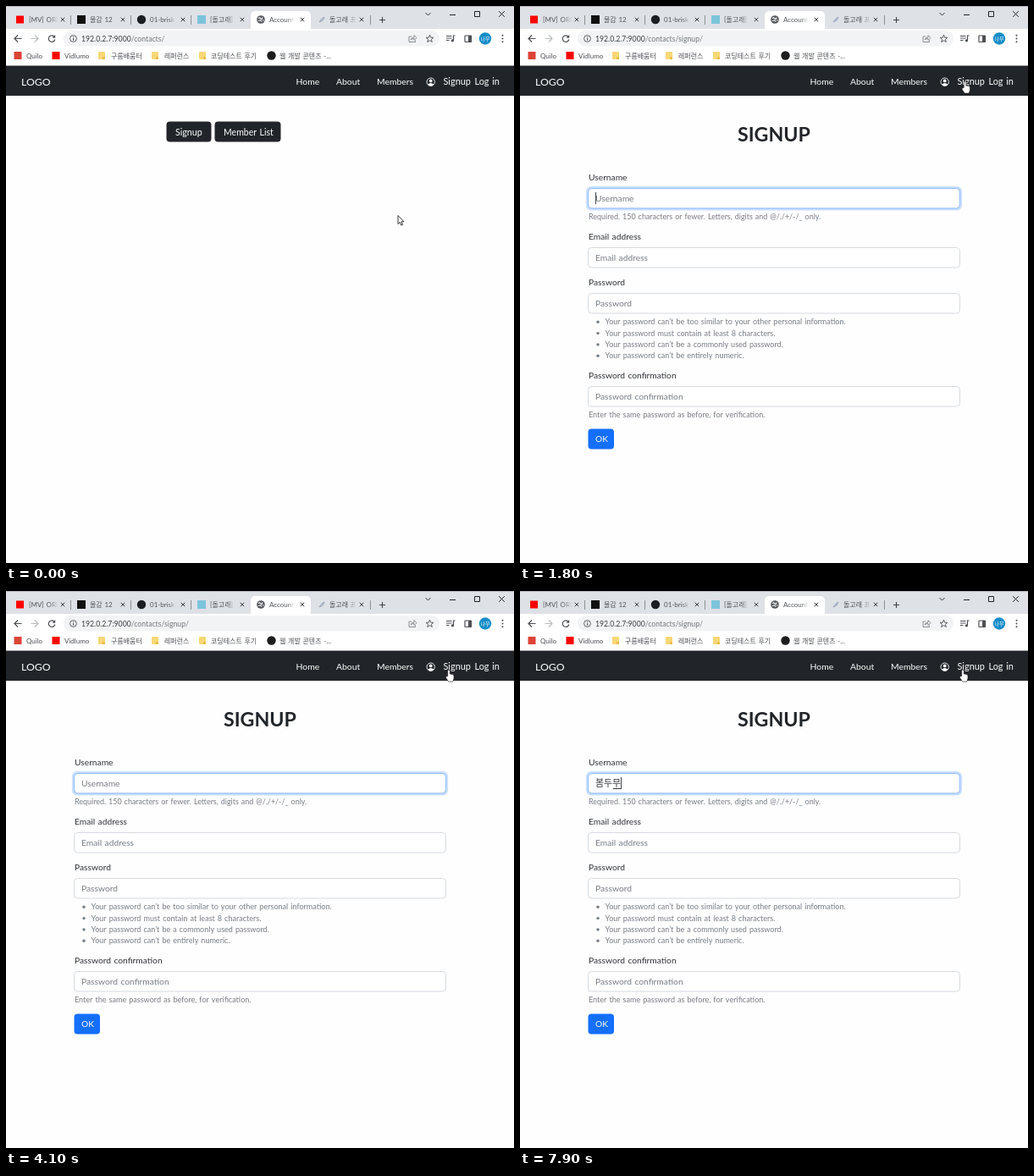
Write an HTML page with a canvas that moves like this. It is 600 by 658 pixels and loops after 8000 ms.

```html
<!DOCTYPE html>
<html lang="ko">
<head>
<meta charset="utf-8">
<style>
html, body { margin: 0; width: 100%; height: 100%; overflow: hidden; background: #fefefe; }
canvas { display: block; }
</style>
</head>
<body>
<canvas id="stage" width="600" height="658"></canvas>
<script>
const ctx = document.getElementById('stage').getContext('2d');
const LOOP = 8000, DARK = '#212529', INK = '#2f3337', GRAY = '#757d85', ICON = '#4b4f54', BLUE = '#146ffb';
const HOST = '192.0.2.7:9000';

function text(s, x, y, size, color = INK, weight = 400) {
  ctx.font = `${weight} ${size}px Lato, "Noto Sans CJK KR", "Noto Sans CJK JP", sans-serif`;
  ctx.wordSpacing = size * 0.08 + 'px';
  ctx.fillStyle = color;
  ctx.fillText(s, x, y);
  return ctx.measureText(s).width;
}
function rect(x, y, w, h, color, r = 0) {
  ctx.fillStyle = color;
  ctx.beginPath();
  ctx.roundRect(x, y, w, h, r);
  ctx.fill();
}
function outline(x, y, w, h, color, r = 0, width = 1) {
  ctx.strokeStyle = color;
  ctx.lineWidth = width;
  ctx.beginPath();
  ctx.roundRect(x, y, w, h, r);
  ctx.stroke();
}
const dot = (x, y, r, color) => rect(x - r, y - r, 2 * r, 2 * r, color, r);
const ring = (x, y, r, color, width) => outline(x - r, y - r, 2 * r, 2 * r, color, r, width);

// Path drawn relative to x, y
function path(d, x, y, stroke, width = 1, fill) {
  const p = new Path2D(d);
  ctx.save();
  ctx.translate(x, y);
  if (fill) { ctx.fillStyle = fill; ctx.fill(p); }
  if (stroke) { ctx.strokeStyle = stroke; ctx.lineWidth = width; ctx.stroke(p); }
  ctx.restore();
}
const cross = (x, y, r, color, width) =>
  path(`M${-r} ${-r}L${r} ${r}M${r} ${-r}L${-r} ${r}`, x, y, color, width);

function tabTitle(s, x, width) {
  const fade = ctx.createLinearGradient(x, 0, x + width, 0);
  fade.addColorStop(0, '#505458');
  fade.addColorStop(0.68, '#505458');
  fade.addColorStop(1, '#50545800');
  text(s, x, 19, 8, fade);
}

function drawTabs() {
  rect(0, 0, 600, 27, '#dee1e6');
  rect(0, 0, 600, 1, '#b4b7bb');
  rect(289, 6, 71, 24, '#fff', 5);
  rect(12, 11.5, 9, 9, '#f00');
  rect(84, 11, 10, 10, '#111');
  dot(160, 16, 5.2, '#1b1f23');
  rect(226, 11, 10, 10, '#7cc4da');
  dot(301, 16, 4.8, '#54585d');
  path('M-3-1.5Q-1-3 0-1T2-2.5M-3 1.5Q0 0 1 2.5M2 1L3.5 1', 301, 16, '#fff', 1.1);
  path('M-3 3L0-1L3-3L1 1Z', 373, 16, '#8a96b0', 0.8, '#c7cfdd');
  tabTitle('[MV] ORBIT', 27, 35);
  tabTitle('물감 12', 99, 40);
  tabTitle('01-brisk', 170, 31);
  tabTitle('[돌고래] 연습', 241, 30);
  tabTitle('Accounts', 311, 30);
  tabTitle('돌고래 프로', 382, 32);
  for (const x of [67, 138, 209, 279, 350, 420]) cross(x, 16, 2.3, '#3f4347', 1);
  for (const x of [76, 147, 218, 430]) rect(x, 11, 1, 11, '#8d9196');
  path('M-3.5 0H3.5M0-3.5V3.5', 444.5, 16.5, '#3f4347', 1.1);
  path('M-3-1.5L0 1.5L3-1.5', 498.5, 9.5, '#333');
  path('M-3.5 0H3.5', 527.5, 10.5, '#222');
  outline(553.5, 6.5, 6, 6, '#222');
  cross(585.5, 9.5, 3.3, '#222', 1);
}

function drawToolbar(url) {
  rect(0, 27, 600, 44, '#fff');
  path('M4.5 0H-4M0-4L-4 0L0 4', 14, 38.5, ICON, 1.2);
  path('M-4.5 0H4M0-4L4 0L0 4', 34, 38.5, '#b9bcc0', 1.2);
  path('M3.2-2A3.8 3.8 0 1 0 3.8 1', 54, 38.5, ICON, 1.2);
  path('M4.2-4.4V-.8H.6Z', 54, 38.5, null, 0, ICON);
  rect(68, 29, 444, 18.5, '#f1f3f4', 9);
  ring(79.5, 38.5, 3.9, ICON, 0.9);
  path('M0-.6V2.2M0-2.3V-1.3', 79.5, 38.5, ICON, 1);
  const w = text(HOST, 89, 41.5, 8.7, '#3c4043');
  text(url, 89 + w, 41.5, 8.7, '#74787d');
  path('M-1-2.5H-4V4H3.5V2M-2 1.5Q-1.5-1.5 2-1.5V-4L5-.8L2 2V0Q-.5 0-2 1.5Z', 480, 38.5, '#74787d', 0.8);
  path('M0-4.4L1.2-1.3L4.4-1.2L1.9.9L2.8 4L0 2.2L-2.8 4L-1.9.9L-4.4-1.2L-1.2-1.3Z', 500.5, 38.5, ICON, 0.9);
  path('M-5-3H1.5M-5-.5H1.5M-5 2H-1.5M3.5 2V-3.5H5.5', 525, 38.5, ICON, 1.2);
  dot(527.4, 40.8, 1.6, ICON);
  outline(542, 35, 7.5, 7.5, ICON, 0.5, 1.2);
  rect(546, 35, 3.5, 7.5, ICON);
  dot(566, 38.5, 7.2, '#168dc9');
  text('나무', 560.6, 41, 6, '#fff');
  for (const y of [34.8, 38.5, 42.2]) dot(586.5, y, 1, ICON);

  rect(9.5, 54, 9, 9, '#dc4437');
  rect(54.5, 54, 9, 9, '#f00');
  for (const x of [109, 172, 228]) {
    rect(x, 54, 8, 9, '#f8d775', 1);
    rect(x + 5, 60, 3, 3, '#e7bd4c', 0.5);
  }
  dot(313.5, 58.5, 5.2, '#1c1c1e');
  const marks = [['Quilo', 24], ['Vidlumo', 69], ['구름배움터', 124], ['레퍼런스', 187],
    ['코딩테스트 후기', 242], ['웹 개발 콘텐츠 -...', 323]];
  for (const [s, x] of marks) text(s, x, 61.5, 8, '#4a4e52');
}

function drawNav() {
  rect(0, 70.5, 600, 35.5, DARK);
  text('LOGO', 18, 93.5, 12.3, '#fff');
  text('Home', 342.5, 92.5, 10.4, '#fff');
  text('About', 390, 92.5, 10.4, '#fff');
  text('Members', 438, 92.5, 10.4, '#fff');
  text('Signup', 516.5, 92.5, 10.9, '#fff');
  text('Log in', 553.5, 92.5, 10.9, '#fff');
  ring(501.7, 89.7, 4.7, '#fff', 0.9);
  dot(501.7, 88.4, 1.9, '#fff');
  path('M-3.6 3Q0-.2 3.6 3Q0 6.4-3.6 3Z', 501.7, 89.7, null, 0, '#fff');
}

function drawHome() {
  rect(189.5, 136.5, 53, 24, DARK, 4);
  rect(246.5, 136.5, 78, 24, DARK, 4);
  text('Signup', 200, 152.5, 10.7, '#fff');
  text('Member List', 257, 152.5, 10.5, '#fff');
}

function field(label, y, value = label) {
  text(label, 81, y - 9, 10.25);
  rect(80.5, y + 0.5, 439, 23.5, '#fff', 4);
  outline(80.5, y + 0.5, 439, 23.5, '#d6dbe0', 4);
  text(value, 89, y + 16, 10.25, GRAY);
}

const KEYS = [[0, ''], [5400, 'ㅂ'], [5600, '보'], [6000, '봄'], [7400, '봄ㄷ'],
  [7600, '봄두'], [7800, '봄둠'], [7900, '봄두무']];
const CARET = [[1400, 1900], [2500, 3000], [3600, 4000], [4600, 5000], [5400, 6600], [7000, 8000]];
const FADES = [1900, 4000, 5000];

function caretAlpha(t) {
  if (CARET.some(([on, off]) => t >= on && t < off)) return 0.85;
  return FADES.some(off => t >= off && t < off + 100) ? 0.4 : 0;
}

function drawSignup(t) {
  const typed = KEYS.findLast(k => t >= k[0])[1];
  text('SIGNUP', 257, 159.5, 23.2, DARK, 700);

  field('Username', 215, typed ? '' : 'Username');
  const focus = t < 1500 ? 0 : t < 1600 ? 0.6 : 1;
  if (focus) {
    ctx.globalAlpha = focus;
    outline(79.2, 214.2, 441.6, 26.1, '#c9dfff', 5, 2.6);
    outline(80.5, 215.5, 439, 23.5, '#90bcfb', 4);
    ctx.globalAlpha = 1;
  }
  let end = 89;
  if (typed) {
    end += text(typed, 89, 231, 10.9) + 0.3;
    const w = ctx.measureText(typed.at(-1)).width;
    rect(end - w + 0.5, 233, w - 1, 1, INK);
  }
  ctx.globalAlpha = caretAlpha(t);
  rect(Math.round(end - 0.5), 220, 1, 14, DARK);
  ctx.globalAlpha = 1;
  text('Required. 150 characters or fewer. Letters, digits and @/./+/-/_ only.', 81, 251.5, 8.95, GRAY);

  field('Email address', 285);
  field('Password', 339);
  [
    'Your password can’t be too similar to your other personal information.',
    'Your password must contain at least 8 characters.',
    'Your password can’t be a commonly used password.',
    'Your password can’t be entirely numeric.'
  ].forEach((s, i) => {
    const y = 376.3 + i * 13.3;
    dot(92, y - 3, 1.7, GRAY);
    text(s, 100.5, y, 9.05, GRAY);
  });
  field('Password confirmation', 449);
  text('Enter the same password as before, for verification.', 81, 486.2, 9.05, GRAY);
  rect(80.5, 499.5, 30.5, 24, BLUE, 4);
  text('OK', 89, 515.2, 10.2, '#fff');
}

function drawPointer(t) {
  if (t < 1100) {
    const k = Math.max(0, Math.floor((t - 600) / 100)) / 5;
    const e = k * k * (3 - 2 * k);
    const x0 = t < 500 ? 463 : 460;
    path('M0 0V10L2.3 7.9L3.8 11.6L5.5 10.9L4 7.3H7Z', x0 + (525 - x0) * e, 247.5 - 157.5 * e, '#222', 0.9, '#fff');
  } else {
    const [x, y] = t < 2200 ? [525.5, 89.5] : [523, 93.5];
    path('M-1.3 7V.9A1.3 1.3 0 0 1 1.3.9V4.4L4.8 5.1Q6 5.5 6 6.8V9.8L4.8 13.6H-.4L-3.4 9Q-3.9 7.4-2.4 7.2Z',
      x, y, '#111', 0.6, '#fff');
  }
}

const start = performance.now();
function draw() {
  const t = (performance.now() - start) % LOOP, signup = t >= 1400;
  rect(0, 0, 600, 658, '#fefefe');
  drawTabs();
  drawToolbar(signup ? '/contacts/signup/' : '/contacts/');
  drawNav();
  if (signup) drawSignup(t); else drawHome();
  drawPointer(t);
  requestAnimationFrame(draw);
}
draw();
</script>
</body>
</html>
```
